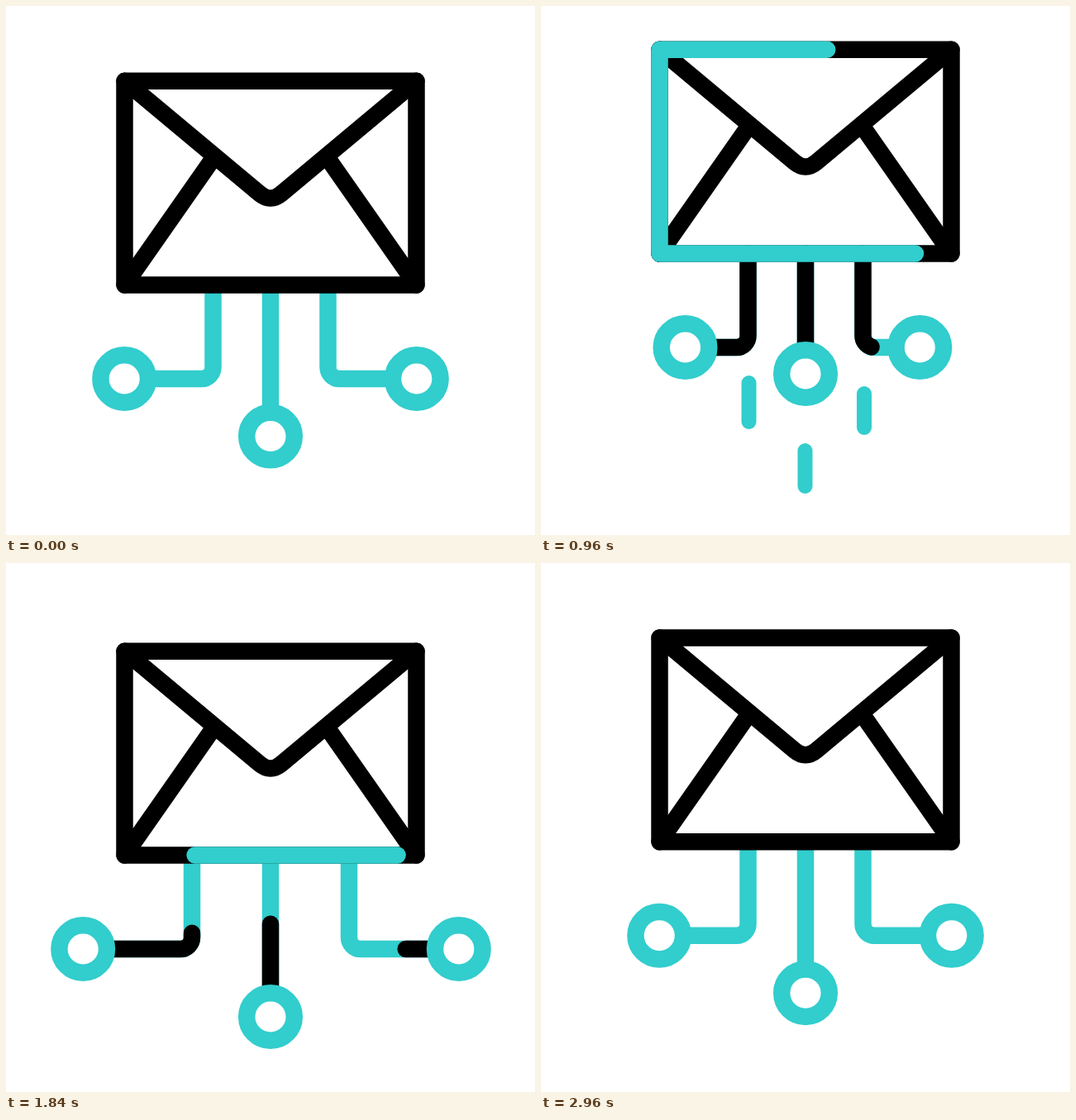
Write an HTML page with a canvas that moves like this. It is 640 px wide and 640 px high and loops after 3 s.

```html
<!DOCTYPE html>
<html lang="en">
<head>
<meta charset="utf-8">
<title>Mail network</title>
<style>
  html, body { margin: 0; width: 100%; height: 100%; overflow: hidden; background: #fff; }
  canvas { display: block; width: 640px; height: 640px; }
</style>
</head>
<body>
<canvas id="stage" width="640" height="640"></canvas>
<script>
const ctx = document.getElementById('stage').getContext('2d');
const LOOP = 3000, STEP = 40;
const TEAL = '#32cdcd', BLACK = '#000', WIDTH = 20.5;
const LEFT = 143.5, RIGHT = 496.5, TOP = 90.7, BOTTOM = 337.5;
const CORNER = 14, NODE_R = 28.8;

// Eased moves between [time, value] keys
function ease(t, keys) {
  if (t <= keys[0][0]) return keys[0][1];
  for (let i = 1; i < keys.length; i++) {
    const [t0, a] = keys[i - 1], [t1, b] = keys[i];
    if (t < t1) {
      const p = (t - t0) / (t1 - t0);
      return a + (b - a) * p * p * (3 - 2 * p);
    }
  }
  return keys[keys.length - 1][1];
}

// Smooth monotone curve through the keys, flat at both ends
function curve(t, keys) {
  const n = keys.length - 1;
  if (t <= keys[0][0]) return keys[0][1];
  if (t >= keys[n][0]) return keys[n][1];
  const rate = i => (keys[i + 1][1] - keys[i][1]) / (keys[i + 1][0] - keys[i][0]);
  const slope = i => {
    if (i === 0 || i === n) return 0;
    const a = rate(i - 1), b = rate(i);
    return a * b <= 0 ? 0 : 2 * a * b / (a + b);
  };
  let i = 0;
  while (t >= keys[i + 1][0]) i++;
  const h = keys[i + 1][0] - keys[i][0], p = (t - keys[i][0]) / h, q = 1 - p;
  return keys[i][1] * q * q * (1 + 2 * p) + keys[i + 1][1] * p * p * (3 - 2 * p)
    + h * p * q * (slope(i) * q - slope(i + 1) * p);
}

const LIFT = [[80, 0], [680, -46.5], [960, -38], [1200, 22.5], [1280, 32], [1440, 39],
  [1560, 40], [1620, 40], [1760, 33], [1840, 16], [2080, -20], [2240, -26.3], [2320, -26.3]];
const TAIL = [[0, 0], [960, 43.5], [1280, 160.5], [1840, 1222.5], [2040, 1540]];
const HEAD = [[520, 0], [960, 802.5], [1280, 1239.5], [1840, 1467.5], [2040, 1540]];

// reach: node offset outward; shift: stem offset outward; on/off: dark stroke timing
const SIDES = [
  { x: 250.5, node: 143.2, dir: -1, on: [285, 840], off: [1605, 2110],
    reach: [[560, 0], [1120, -39], [1220, -39], [1820, 50], [2080, 50], [2640, 0]],
    shift: [[1200, 0], [1800, 25.5], [2060, 25.5], [2640, 0]] },
  { x: 389.5, node: 496.8, dir: 1, on: [520, 1140], off: [1470, 1970],
    reach: [[320, 0], [680, -38.5], [1120, -38.5], [1700, 51], [1980, 51], [2660, 0]],
    shift: [[1160, 0], [1760, 25.5], [2050, 25.5], [2640, 0]] }
];
const MIDDLE = { on: [325, 880], off: [1590, 2090],
  reach: [[420, 0], [820, -37.5], [1160, -37.5], [1620, 12.5], [2000, 12.5], [2580, 0]] };
const TRAILS = [[251.5, 456, 503], [319.5, 538, 581], [391, 469, 510]];

function stroke(path, color, width = WIDTH, cap = 'round') {
  ctx.strokeStyle = color;
  ctx.lineWidth = width;
  ctx.lineCap = cap;
  ctx.stroke(path);
}

function strokePart(path, color, from, to) {
  if (to - from < 0.1) return;
  ctx.setLineDash([to - from, 1e4]);
  ctx.lineDashOffset = -from;
  stroke(path, color);
  ctx.setLineDash([]);
}

const ramp = (t, [a, b]) => ease(t, [[a, 0], [b, 1]]);

function stem(path, length, t, item) {
  stroke(path, TEAL, WIDTH, 'butt');
  strokePart(path, BLACK, length * ramp(t, item.off), length * ramp(t, item.on));
}

function node(x, y) {
  const ring = new Path2D();
  ring.arc(x, y, NODE_R, 0, Math.PI * 2);
  ctx.fillStyle = '#fff';
  ctx.fill(ring);
  stroke(ring, TEAL);
}

function drawTrails(t) {
  const grow = ease(t, [[285, 0], [650, 1]]), fade = ease(t, [[960, 0], [1220, 1]]);
  for (const [x, a, b] of TRAILS) {
    const y0 = a + (b - a) * fade, y1 = a + (b - a) * grow;
    if (y1 - y0 < 0.1) continue;
    const line = new Path2D();
    line.moveTo(x, y0);
    line.lineTo(x, y1);
    stroke(line, TEAL, 18);
  }
}

function drawSide(t, side) {
  const y = 451, d = side.dir;
  const x = side.x + d * ease(t, side.shift);
  const nx = side.node + d * ease(t, side.reach);
  const end = nx - d * NODE_R;
  const path = new Path2D();
  path.moveTo(x, BOTTOM);
  path.lineTo(x, y - CORNER);
  path.arcTo(x, y, x + d * CORNER, y, CORNER);
  path.lineTo(end, y);
  const length = y - BOTTOM - 2 * CORNER + CORNER * Math.PI / 2 + Math.abs(end - x);
  stem(path, length, t, side);
  node(nx, y);
}

function drawMiddle(t) {
  const y = 520.5 + ease(t, MIDDLE.reach);
  const path = new Path2D();
  path.moveTo(320, BOTTOM);
  path.lineTo(320, y - NODE_R);
  stem(path, y - NODE_R - BOTTOM, t, MIDDLE);
  node(320, y);
}

const frame = new Path2D();
frame.rect(LEFT, TOP, RIGHT - LEFT, BOTTOM - TOP);

const folds = new Path2D();
folds.moveTo(LEFT, TOP);
folds.lineTo(307, 227.2);
folds.quadraticCurveTo(320, 238, 333, 227.2);
folds.lineTo(RIGHT, TOP);
folds.moveTo(LEFT, BOTTOM);
folds.lineTo(252.2, 182.2);
folds.moveTo(RIGHT, BOTTOM);
folds.lineTo(387.8, 182.2);

// Two clockwise laps from the bottom right corner
const laps = new Path2D();
laps.moveTo(RIGHT, BOTTOM);
for (let i = 0; i < 2; i++) {
  laps.lineTo(LEFT, BOTTOM);
  laps.lineTo(LEFT, TOP);
  laps.lineTo(RIGHT, TOP);
  laps.lineTo(RIGHT, BOTTOM);
}

function draw(t) {
  ctx.fillStyle = '#fff';
  ctx.fillRect(0, 0, 640, 640);
  ctx.lineJoin = 'round';
  drawTrails(t);
  ctx.save();
  ctx.translate(0, t < 2320 ? curve(t, LIFT) : ease(t, [[2320, -26.3], [LOOP, 0]]));
  SIDES.forEach(side => drawSide(t, side));
  drawMiddle(t);
  stroke(folds, BLACK);
  stroke(frame, BLACK);
  strokePart(laps, TEAL, curve(t, TAIL), curve(t, HEAD));
  ctx.restore();
}

const start = performance.now();
function tick() {
  const t = (performance.now() - start) % LOOP;
  draw(Math.floor(t / STEP) * STEP);
  requestAnimationFrame(tick);
}
tick();
</script>
</body>
</html>
```
